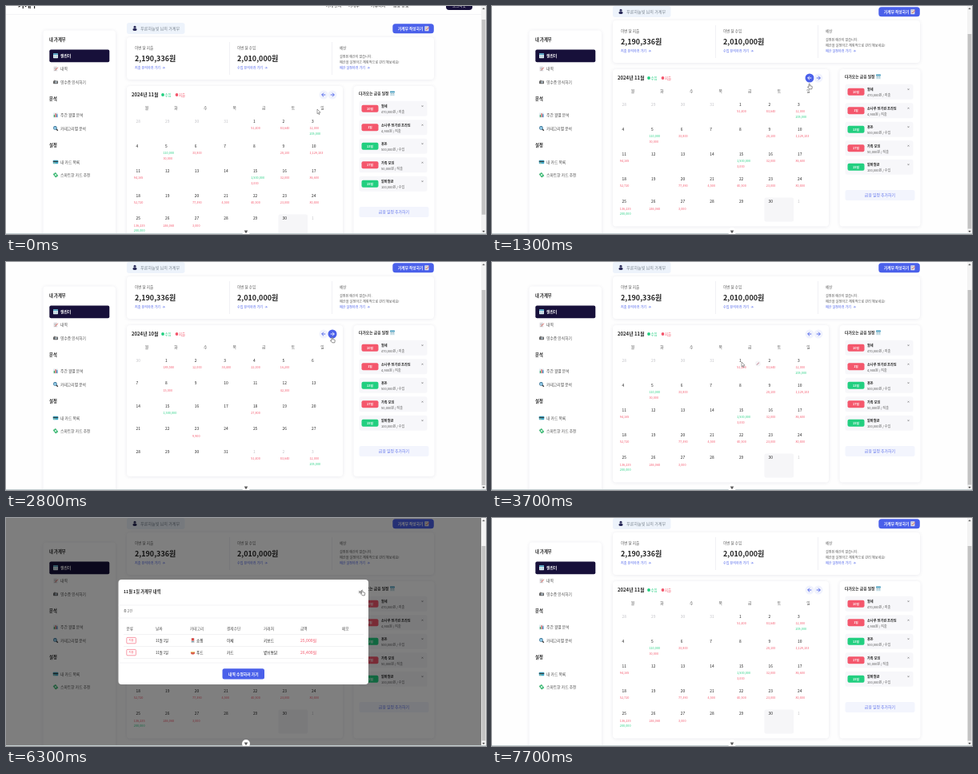
Recreate the animation shown at these times as an HTML page with a canvas. Size 600 by 285 pixels, loop 7.8 s.

```html
<!DOCTYPE html>
<html lang="ko">
<head>
<meta charset="utf-8">
<title>가계부</title>
<style>
html, body { margin: 0; width: 100%; height: 100%; overflow: hidden; background: #fff; }
canvas { display: block; width: 600px; height: 285px; }
</style>
</head>
<body>
<canvas id="stage"></canvas>
<script>
const cv = document.getElementById('stage');
const c = cv.getContext('2d');
const dpr = window.devicePixelRatio || 1;
cv.width = 600 * dpr;
cv.height = 285 * dpr;

const LOOP = 7800, STEP = 100;
const FONT = '"Noto Sans CJK KR","Noto Sans KR","Noto Sans CJK JP","Noto Sans",sans-serif';
const BLUE = '#4a60ea', RED = '#f4576c', GREEN = '#22cf80', INK = '#222', GRAY = '#555', NAVY = '#17103a';
const PALE = '#f1f3fd';
const COL = 36.6, GRID_X = 157.5, GRID_Y = 117;

// Amounts by month and day; + is income, - is spending
const money = {
  10: { 1: ['-189,580'], 2: ['-12,000'], 3: ['-30,400'], 4: ['-22,000'], 5: ['-16,200'],
        8: ['-15,000'], 12: ['-42,300'], 15: ['+1,500,000'], 18: ['-27,800'], 23: ['-9,900'] },
  11: { 1: ['-51,400'], 2: ['-83,640'], 3: ['-12,000', '+205,000'], 5: ['+110,000', '-30,000'],
        6: ['-33,800'], 9: ['-28,100'], 10: ['-1,129,103'], 11: ['-94,165'],
        15: ['+1,500,000', '-3,000'], 16: ['-32,000'], 17: ['-86,600'], 18: ['-52,720'],
        20: ['-77,390'], 21: ['-4,500'], 22: ['-40,500'], 23: ['-23,000'], 24: ['-80,800'],
        25: ['-136,235', '+200,000'], 26: ['-246,068'], 27: ['-3,000'] }
};

const plans = [
  ['10일', '월세', '470,000원 / 지출', RED],
  ['1일', '소나루 정기권 프라임', '4,900원 / 지출', RED],
  ['13일', '용돈', '500,000원 / 수입', GREEN],
  ['17일', '가족 모임', '50,000원 / 지출', RED],
  ['15일', '알바월급', '100,000원 / 수입', GREEN]
];

// Cursor tip: time, x, y
const path = [
  [0, 389, 129], [200, 389, 129], [600, 396, 118], [1200, 396, 97], [2300, 396, 97],
  [2600, 407, 94], [3100, 407, 94], [3600, 312, 125], [4200, 312, 125], [4600, 309, 119.5],
  [4900, 309, 119.5], [5600, 444.5, 90], [6500, 444.5, 90], [7100, 452, -20], [7800, 452, -20]
];

const ease = k => k * k * (3 - 2 * k);
const clamp = k => Math.max(0, Math.min(1, k));

function cursorAt(t) {
  let i = 0;
  while (i < path.length - 2 && t >= path[i + 1][0]) i++;
  const [t0, x0, y0] = path[i], [t1, x1, y1] = path[i + 1];
  const k = ease(clamp((t - t0) / (t1 - t0)));
  return { x: x0 + (x1 - x0) * k, y: y0 + (y1 - y0) * k };
}

function text(s, x, y, size, color = INK, weight = 400, align = 'left') {
  c.save();
  c.translate(x, y);
  c.scale(0.1, 0.1);
  c.font = `${weight} ${size * 10}px ${FONT}`;
  c.textAlign = align;
  c.textBaseline = 'middle';
  c.fillStyle = color;
  c.fillText(s, 0, 0);
  c.restore();
}

function rect(x, y, w, h, color, r = 0) {
  c.fillStyle = color;
  c.beginPath();
  c.roundRect(x, y, w, h, r);
  c.fill();
}

function dot(x, y, r, color) {
  c.fillStyle = color;
  c.beginPath();
  c.arc(x, y, r, 0, 7);
  c.fill();
}

function line(pts, color, w = 0.6, fill) {
  c.beginPath();
  pts.forEach(([x, y]) => c.lineTo(x, y));
  if (fill) {
    c.closePath();
    c.fillStyle = fill;
    c.fill();
  }
  c.strokeStyle = color;
  c.lineWidth = w;
  c.stroke();
}

function card(x, y, w, h) {
  c.save();
  c.shadowColor = 'rgba(60,60,110,.11)';
  c.shadowBlur = 4 * dpr;
  c.shadowOffsetY = 0.5 * dpr;
  rect(x, y, w, h, '#fff', 4);
  c.restore();
}

function cross(x, y, r, color, w) {
  line([[x - r, y - r], [x + r, y + r]], color, w);
  line([[x + r, y - r], [x - r, y + r]], color, w);
}

function arrow(x, y, dir, r, color, w) {
  line([[x - r * dir, y], [x + r * dir, y]], color, w);
  line([[x, y - r], [x + r * dir, y], [x, y + r]], color, w);
}

const icons = {
  calendar(x, y) {
    rect(x - 3, y - 3, 6, 6, '#e6f3f7', 0.6);
    rect(x - 3, y - 3, 6, 1.8, '#4a9fc0', 0.6);
    for (let i = 0; i < 6; i++) rect(x - 2.2 + i % 3 * 1.7, y - 0.4 + (i > 2) * 1.6, 1, 0.9, '#7fa6b5');
  },
  note(x, y) {
    rect(x - 2.6, y - 3, 5, 6, '#e8e6ea', 0.4);
    for (let i = 0; i < 3; i++) rect(x - 1.8, y - 1.8 + i * 1.6, 3, 0.5, '#999');
    line([[x - 0.5, y + 1.6], [x + 2.8, y - 1.8]], '#e2574c', 0.9);
  },
  camera(x, y) {
    rect(x - 3, y - 1.6, 6, 3.8, '#666', 0.6);
    rect(x - 2, y - 2.2, 1.8, 0.9, '#666');
    dot(x + 0.5, y + 0.3, 1.2, '#a9b8c4');
  },
  chart(x, y) {
    rect(x - 3, y - 3, 6, 6, '#dfeaf0', 0.5);
    rect(x - 2.2, y - 0.5, 1.2, 3, '#3fae6a');
    rect(x - 0.5, y - 2.3, 1.2, 4.8, '#d9534f');
    rect(x + 1.2, y - 1.4, 1.2, 3.9, '#3b82c4');
  },
  lens(x, y) {
    line([[x + 0.8, y + 0.8], [x + 2.8, y + 2.8]], '#333', 1.3);
    dot(x - 0.6, y - 0.6, 2.3, '#2f6f95');
    dot(x - 0.6, y - 0.6, 1.5, '#9fd3ee');
  },
  bank(x, y) {
    rect(x - 3.2, y - 2, 6.4, 4.4, '#3fa9c9', 0.6);
    rect(x - 3.2, y - 1, 6.4, 1.1, '#333');
    rect(x - 2.4, y + 1, 2, 0.7, '#f3d36b');
  },
  bill(x, y) {
    line([[x - 3, y - 1], [x, y - 3], [x + 3, y + 1], [x, y + 3]], '#2d9c5b', 0.4, '#3cbf78');
    dot(x, y, 1.1, '#d8f5e3');
  },
  bag(x, y) {
    rect(x - 2.4, y - 2.8, 4.8, 5.8, '#e4dfe0', 0.4);
    rect(x - 1.4, y - 2.8, 2.8, 3.2, '#d8433f');
    rect(x - 1.4, y + 1.2, 2.8, 1, '#5b8f9e');
  },
  bowl(x, y) {
    c.fillStyle = '#d85a4a';
    c.beginPath();
    c.arc(x, y, 2.6, 0, Math.PI);
    c.fill();
    rect(x - 2.6, y - 0.9, 5.2, 1, '#e9c46a');
  }
};

function pencil(x, y) {
  dot(x, y, 3.4, '#f5f5f7');
  line([[x - 1.4, y + 1.4], [x + 1.4, y - 1.4]], '#cf9ca6', 1.1);
  dot(x - 1.6, y + 1.6, 0.4, '#888');
}

function buildRows(month) {
  const lead = (new Date(2024, month - 1, 1).getDay() + 6) % 7;
  const days = new Date(2024, month, 0).getDate();
  const count = Math.ceil((lead + days) / 7);
  const rows = [];
  let top = GRID_Y;
  for (let r = 0; r < count; r++) {
    const cells = [];
    for (let i = 0; i < 7; i++) {
      const d = new Date(2024, month - 1, r * 7 + i - lead + 1);
      const m = d.getMonth() + 1, day = d.getDate();
      cells.push({ day, inside: m === month, today: m === 11 && day === 30, sums: (money[m] || {})[day] || [] });
    }
    const h = cells.some(k => k.sums.length > 1) ? 31 : 28.5;
    rows.push({ top, h, cells });
    top += h;
  }
  return rows;
}

function drawNav() {
  rect(0, -40, 594, 29, '#fff');
  rect(0, -11, 594, 0.6, '#ececf0');
  text('가계부', 15, -22.5, 9, '#222', 700);
  ['가계 관리', '가계부', '커뮤니티', '금융 상품'].forEach((s, i) => text(s, 400 + i * 28, -22, 5, '#333', 500));
  rect(550, -29, 33, 13, NAVY, 4);
  text('로그아웃', 566.5, -22, 4.6, '#fff', 500, 'center');
}

function drawTop() {
  rect(151, 0, 72.5, 14, '#edf3fb', 3);
  dot(161, 5.3, 1.5, '#2b2c5a');
  rect(158.5, 7, 5, 3, '#2b2c5a', 1.4);
  text('푸른하늘빛 님의 가계부', 168, 7, 5.1, '#7d8792');
  rect(483.3, 1.2, 51.5, 12, BLUE, 3.5);
  text('가계부 작성하기', 490, 7.2, 4.7, '#fff', 700);
  icons.note(526, 7.2);

  card(151, 18, 384, 53);
  [279, 407].forEach(x => rect(x, 24, 0.6, 41, '#e8e8ee'));
  [[161, '지출', '2,190,336원'], [289, '수입', '2,010,000원']].forEach(([x, kind, sum]) => {
    text('이번 달 ' + kind, x, 31, 4.6, GRAY);
    text(sum, x, 44.8, 9, INK, 700);
    text(kind + ' 분석하러 가기', x, 56, 4.1, BLUE, 500);
    arrow(x + 36, 56.2, 1, 1.3, BLUE, 0.5);
  });
  text('예산', 417, 31, 4.5, GRAY);
  text('설정된 예산이 없습니다.', 417, 42.5, 4.1, GRAY);
  text('예산을 설정하고 계획적으로 관리 해보세요!', 417, 49.3, 4.2, GRAY);
  text('예산 설정하러 가기', 417, 56, 4.1, BLUE, 500);
  arrow(453, 56.2, 1, 1.3, BLUE, 0.5);
}

function drawCalendar(month, rows, mouse, bottom) {
  card(151, 79, 270, bottom - 79);
  text(`2024년 ${month}월`, 157, 90, 6, INK, 700);
  dot(196, 90, 1.9, GREEN);
  text('수입', 198.4, 90, 4.4, GREEN, 500);
  dot(213.5, 90, 1.9, RED);
  text('지출', 216, 90, 4.4, RED, 500);

  [[397, -1], [408, 1]].forEach(([x, dir]) => {
    const over = mouse && Math.hypot(mouse.x - x, mouse.y - 90) < 7.5;
    dot(x, 90, 5.5, over ? BLUE : PALE);
    arrow(x, 90, dir, 2.3, over ? '#fff' : BLUE, 0.9);
  });
  [...'월화수목금토일'].forEach((s, i) => text(s, 175.9 + i * COL, 106, 4.8, GRAY, 400, 'center'));

  rows.forEach(({ top, h, cells }) => cells.forEach((cell, i) => {
    const x = GRID_X + i * COL;
    if (cell.today) rect(x, top + 1, COL, h - 1, '#f6f6f8', 2);
    text(String(cell.day), x + 5, top + 5.7, 4.9, cell.inside ? INK : '#c2c2c6', cell.inside ? 500 : 400);
    cell.sums.forEach((s, n) =>
      text(s.slice(1), x + 2.3, top + 14.7 + n * 6.4, 3.8, s[0] === '+' ? GREEN : RED));
    if (mouse && mouse.x >= x && mouse.x < x + COL && mouse.y >= top && mouse.y < top + h)
      pencil(x + 28.6, top + 10);
  }));
}

function drawPlans(bottom) {
  card(434.5, 79, 101, bottom - 79);
  text('다가오는 금융 일정', 441, 88.5, 4.8, INK, 700);
  icons.calendar(483, 88.5);
  plans.forEach(([day, name, info, color], i) => {
    const y = 107.2 + i * 23.5;
    rect(441.5, y - 9.5, 85, 19, '#f7f7fa', 2.5);
    rect(444.5, y - 4.5, 21, 9, color, 2);
    text(day, 455, y, 3.8, '#fff', 700, 'center');
    text(name, 469, y - 2.5, 4.2, INK, 700);
    text(info, 469, y + 4.4, 4.05, GRAY);
    cross(520.5, y - 3, 0.9, '#555', 0.5);
  });
  rect(441.5, 230, 87, 13, '#f3f5fd', 2.5);
  text('금융 일정 추가하기', 485, 236.5, 4.9, '#6174ec', 400, 'center');
}

function drawSidebar() {
  card(46.5, 30.5, 90.5, 262);
  [['내 가계부', 42], ['분석', 116], ['설정', 174.3]].forEach(([s, y]) => text(s, 54, y, 5.3, INK, 700));
  rect(54.3, 54.5, 75, 15.8, NAVY, 2);
  [['calendar', '캘린더', 62.2], ['note', '내역', 78.6], ['camera', '영수증 인식하기', 95],
   ['chart', '주간 월별 분석', 136.6], ['lens', '카테고리별 분석', 153],
   ['bank', '내 카드 목록', 194.8], ['bill', '스마트한 카드 추천', 211.2]].forEach(([icon, s, y], i) => {
    icons[icon](62, y);
    text(s, 68, y, 4.8, i ? '#4a4a4a' : '#fff', i ? 400 : 700);
  });
}

function drawModal() {
  rect(0, 0, 594, 284, 'rgba(0,0,0,.5)');
  rect(140.5, 77, 312.5, 131, '#fff', 4);
  text('11월 1일 가계부 내역', 147, 92.3, 5.2, INK, 700);
  cross(442.6, 92.5, 1.5, '#222', 0.7);
  [109, 125, 181].forEach(y => rect(140.5, y - 0.3, 312.5, 0.6, '#e6e6ea'));
  text('총 2건', 147, 116.6, 4.2, GRAY);
  const cols = [150.5, 187, 230, 276, 322, 368, 420];
  ['분류', '날짜', '카테고리', '결제수단', '거래처', '금액', '메모'].forEach((s, i) => text(s, cols[i], 138, 4.7, GRAY));
  [['bag', '쇼핑', '이체', '키보드', '25,000원'],
   ['bowl', '푸드', '카드', '볕뉘통닭', '26,400원']].forEach(([icon, kind, pay, shop, sum], i) => {
    const y = 153 + i * 15;
    rect(147, y - 7.6, 300, 0.6, '#e6e6ea');
    c.strokeStyle = RED;
    c.lineWidth = 0.6;
    c.beginPath();
    c.roundRect(150.8, y - 3.6, 11.6, 7.4, 1);
    c.stroke();
    text('지출', 156.6, y + 0.1, 3.4, RED, 400, 'center');
    text('11월 1일', 187, y, 4.3, INK, 500);
    icons[icon](233.5, y);
    text(kind, 238, y, 4.7, INK, 500);
    text(pay, 276, y, 4.7, INK, 500);
    text(shop, 322, y, 4.7, INK, 500);
    text(sum, 368, y, 5.1, RED);
  });
  rect(147, 175.4, 300, 0.6, '#e6e6ea');
  rect(270.5, 188.3, 52.5, 13.2, BLUE, 2.5);
  text('내역 수정하러 가기', 296.8, 195, 4.8, '#fff', 700, 'center');
}

function drawChrome(scroll, page) {
  const unit = 273 / page;
  rect(594, 0, 6, 285, '#f3f3f3');
  rect(594.6, 6 + scroll * unit, 4.8, 285 * unit, '#c3c3c3');
  line([[595.6, 4], [597, 2.2], [598.4, 4]], '#666', 0.3, '#666');
  line([[595.6, 281], [597, 282.8], [598.4, 281]], '#444', 0.3, '#444');
  rect(0, 284, 600, 1, '#c3ced0');
  dot(300, 282, 5, '#fff');
  line([[298, 280.7], [302, 280.7], [300, 284]], '#555', 0.3, '#555');
}

function drawCursor({ x, y }, hand) {
  c.save();
  c.translate(x, y);
  c.scale(0.9, 0.9);
  c.lineJoin = 'round';
  if (hand) {
    line([[0, 0.6], [0.8, 0], [1.5, 0.6], [1.5, 3], [4.4, 3.6], [4.8, 4.6], [4.2, 7.6], [1, 7.6],
      [-1.7, 4.7], [-1, 4.1], [0, 4.8], [0, 0.6]], '#333', 0.6, '#fff');
  } else {
    line([[0, 0], [0, 6.4], [1.5, 5.1], [2.5, 7.4], [3.4, 7], [2.5, 4.8], [4.5, 4.6], [0, 0]], '#444', 0.55, '#fff');
  }
  c.restore();
}

function monthAt(t) {
  if (t >= 1800 && t < 2700) return 9;
  if (t >= 1500 && t < 3000) return 10;
  return 11;
}

function draw(t) {
  const shift = 21 * (1 - ease(clamp((t - 50) / 350)));
  const tip = cursorAt(t);
  const open = t >= 4300 && t < 6400;
  const mouse = open ? null : { x: tip.x, y: tip.y - shift };
  const month = monthAt(t);
  const rows = buildRows(month);
  const last = rows[rows.length - 1];
  const bottom = last.top + last.h + 6;

  c.setTransform(dpr, 0, 0, dpr, 0, 0);
  rect(0, 0, 600, 285, '#fefefe');
  c.save();
  c.translate(0, shift);
  drawNav();
  drawTop();
  drawCalendar(month, rows, mouse, bottom);
  drawPlans(bottom);
  c.restore();
  drawSidebar();
  if (open) drawModal();
  drawChrome(34 - shift, Math.max(319, bottom + 44));

  const onArrow = mouse && mouse.y < 99 && tip.x > 390 && tip.x < 415;
  const onClose = open && tip.x > 438;
  drawCursor(tip, onArrow || onClose);
}

function tick(now) {
  draw(Math.floor(now % LOOP / STEP) * STEP);
  requestAnimationFrame(tick);
}
requestAnimationFrame(tick);
</script>
</body>
</html>
```
